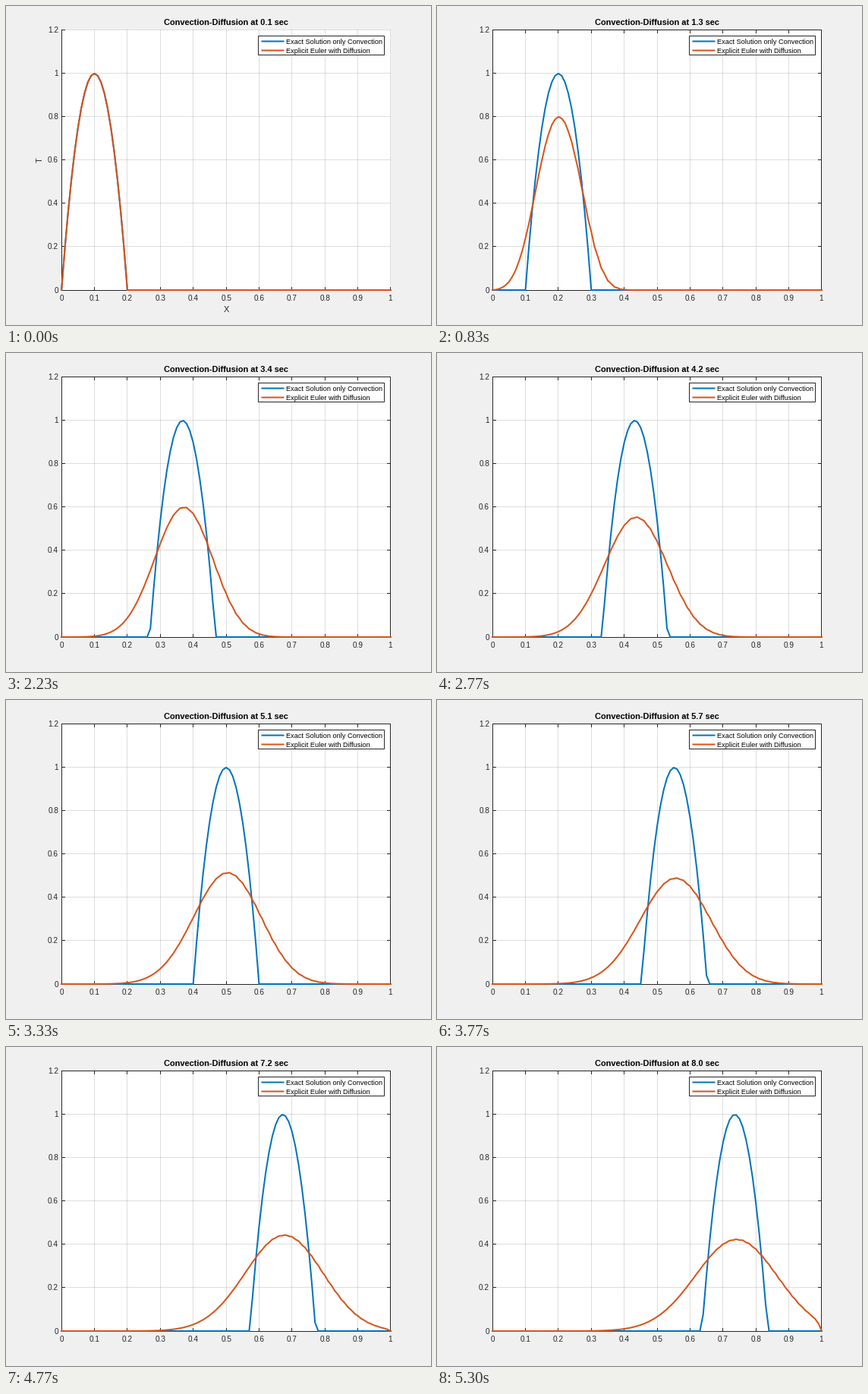
Animation of 560 by 420 pixels, one loop 5330 ms. Source, as a matplotlib script:

```python
import numpy as np
import matplotlib.pyplot as plt
from matplotlib.animation import FuncAnimation
from matplotlib.collections import LineCollection
from matplotlib.patches import Rectangle

W, H, DPI = 560, 420, 100
PX = 72 / DPI  # points per pixel
LOOP_MS, TICK_MS, STEPS = 5330, 10, 160
LEFT, RIGHT, TOP, BOTTOM = 73.15, 506.95, 31.9, 374.0
BLUE, ORANGE, INK = "#0072BD", "#D95319", "#262626"
TICK = 5

plt.rcParams["font.family"] = "Liberation Sans"

# Convection-diffusion of a parabolic pulse, T = 0 at both ends
U, D, DT = 0.08, 0.001, 0.05
x = np.linspace(0, 1, 101)
dx = x[1] - x[0]


def exact(n):
    return np.clip(1 - ((x - 0.1 - U * DT * n) / 0.1) ** 2, 0, None)


def euler_step(T):
    new = T.copy()
    new[1:-1] += (D * DT / dx**2 * (T[2:] - 2 * T[1:-1] + T[:-2])
                  - U * DT / (2 * dx) * (T[2:] - T[:-2]))
    new[0] = new[-1] = 0
    return new


history = [exact(0)]
for _ in range(STEPS - 1):
    history.append(euler_step(history[-1]))


# Everything is drawn in pixel coordinates, y downwards
fig = plt.figure(figsize=(W / 100, H / 100), dpi=DPI, facecolor="#F0F0F0")
ax = fig.add_axes([0, 0, 1, 1])
ax.set(xlim=(0, W), ylim=(H, 0))
ax.axis("off")


def to_x(v):
    return LEFT + v * (RIGHT - LEFT)


def to_y(v):
    return BOTTOM - v / 1.2 * (BOTTOM - TOP)


def centre(p):
    return np.floor(p) + 0.5


def rect(px, py, w, h, **kw):
    ax.add_patch(Rectangle((px, py), w, h, fc="white", snap=False, **kw))


def rules(segments, zorder, **kw):
    lines = LineCollection(segments, colors=INK, linewidths=PX, snap=False,
                           zorder=zorder, **kw)
    return ax.add_collection(lines, autolim=False)


def vline(px, y0, y1):
    return [(px, y0), (px, y1)]


def hline(py, x0, x1):
    return [(x0, py), (x1, py)]


def label(px, py, text, size, ha="center", color=INK, **kw):
    return ax.text(px, py, text, fontsize=size * PX, ha=ha,
                   va=kw.pop("va", "baseline"), color=color, **kw)


xticks, yticks = np.arange(11) / 10, np.arange(7) / 5
cols, rows = centre(to_x(xticks)), centre(to_y(yticks))
x0, x1 = cols[0] - 0.5, cols[-1] + 0.5
y0, y1 = rows[-1] - 0.5, rows[0] + 0.5

rect(x0, y0, x1 - x0, y1 - y0, ec="none", zorder=0)
rules([vline(c, y0, y1) for c in cols] + [hline(r, x0, x1) for r in rows],
      1, alpha=0.15)
rules([vline(cols[0], y0, y1), hline(rows[0], x0, x1)]
      + [vline(c, y1 - TICK, y1) for c in cols]
      + [hline(r, x0, x0 + TICK) for r in rows], 2)
box = rules([vline(cols[-1], y0, y1), hline(rows[-1], x0, x1)]
            + [vline(c, y0, y0 + TICK) for c in cols]
            + [hline(r, x1 - TICK, x1) for r in rows], 2)

for v, c in zip(xticks, cols):
    label(c, 388, f"{v:g}", 10)
for v, r in zip(yticks, rows):
    label(69, r + 3.5, f"{v:g}", 10, "right")

title = label(289.8, 25, "", 11, color="black", weight="bold")
axis_names = [label(290, 403, "X", 11),
              label(45, 203, "T", 11, va="center", rotation=90)]

style = dict(lw=2 * PX, zorder=3, snap=False)
exact_line, = ax.plot(to_x(x), to_y(history[0]), color=BLUE, **style)
euler_line, = ax.plot(to_x(x), to_y(history[0]), color=ORANGE, **style)

rect(332.5, 39.5, 166, 25, ec=INK, lw=PX, zorder=4)
entries = [("Exact Solution only Convection", BLUE),
           ("Explicit Euler with Diffusion", ORANGE)]
for row, (text, color) in enumerate(entries):
    y = 46.5 + 12 * row
    ax.plot([336.5, 366.5], [y, y], color=color, lw=2 * PX, zorder=5,
            snap=False, solid_capstyle="butt")
    label(369, y + 3.5, text, 9.1, "left", "black", zorder=5)


def draw(tick):
    n = (3 * tick + 1) // 10  # 30 steps a second on a 10 ms clock
    for name in axis_names:
        name.set_visible(n == 0)
    box.set_visible(n > 0)
    exact_line.set_ydata(to_y(exact(n)))
    euler_line.set_ydata(to_y(history[n]))
    title.set_text(f"Convection-Diffusion at {DT * (n + 1):.1f} sec")
    return exact_line, euler_line, title


anim = FuncAnimation(fig, draw, frames=LOOP_MS // TICK_MS, interval=TICK_MS,
                     repeat=True, repeat_delay=0, blit=False)
plt.show()
```
